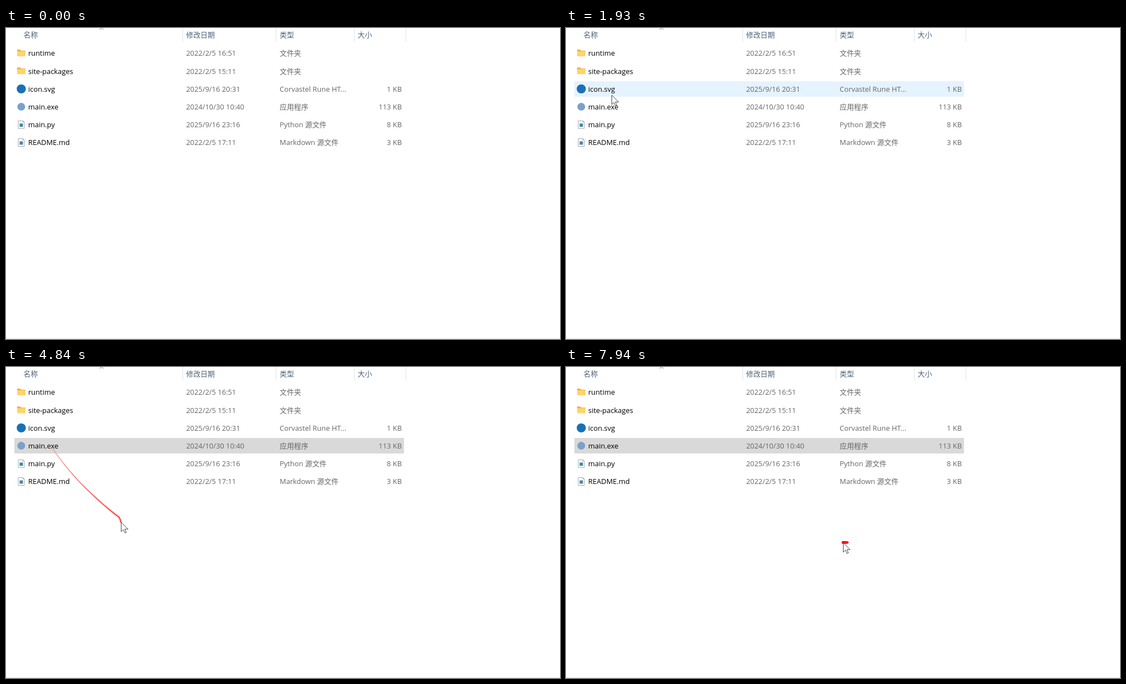
Animation, 998 px wide and 561 px high, one loop 8000 ms. Source, as an HTML page with a canvas:

```html
<!DOCTYPE html>
<html lang="zh-CN">
<head>
<meta charset="utf-8">
<title>文件列表</title>
<style>
html, body { margin: 0; width: 100%; height: 100%; overflow: hidden; background: #fff; }
svg, canvas { position: absolute; left: 0; top: 0; }
text { font: 12.9px "Open Sans", "Noto Sans CJK SC", "Noto Sans CJK", sans-serif; fill: #666; }
.name { fill: #000; }
.head { fill: #4c607a; }
.size { text-anchor: end; }
</style>
</head>
<body>
<svg id="list" width="998" height="561" viewBox="0 0 998 561"></svg>
<canvas id="overlay" width="998" height="561"></canvas>
<script>
const LOOP = 8000, LIFE = 500, LAG = 40;
const ENTER = 650, SELECT = 2690, PRESS = 70, LAUNCH = 3060, READY = 3910, GESTURE = 4390;
const clicks = [SELECT, 2930];
const selectedRow = 3;
const list = document.getElementById('list');
const ctx = document.getElementById('overlay').getContext('2d');

const files = [
  ['folder', 'runtime', '2022/2/5 16:51', '文件夹', ''],
  ['folder', 'site-packages', '2022/2/5 15:11', '文件夹', ''],
  ['web', 'icon.svg', '2025/9/16 20:31', 'Corvastel Rune HT...', '1 KB'],
  ['app', 'main.exe', '2024/10/30 10:40', '应用程序', '113 KB'],
  ['py', 'main.py', '2025/9/16 23:16', 'Python 源文件', '8 KB'],
  ['md', 'README.md', '2022/2/5 17:11', 'Markdown 源文件', '3 KB'],
];

// Icons are drawn around their own centre.
const sheet = mark => `<path d="M-5.5 -7H3L5.5 -4.5V7H-5.5Z" fill="#fff" stroke="#a3a8ad"/>
  <path d="M3 -7V-4.5H5.5" fill="none" stroke="#a3a8ad"/>
  <rect x="-3" y="-2" width="6" height="6" fill="${mark}"/>`;
const icons = {
  folder: `<path d="M-7.5 -6.5H-2L0 -4.5H7.5V0H-7.5Z" fill="#ecb23c"/>
    <rect x="-7.5" y="-3.5" width="15" height="9" rx="1" fill="#ffd56b"/>`,
  web: '<circle r="8.2" fill="#1a70b6"/>',
  app: '<circle r="7" fill="#7ba0cc"/>',
  py: sheet('#3f87a6'),
  md: sheet('#4c87a4'),
};

const text = (cls, x, y, s) => `<text class="${cls}" x="${x}" y="${y}">${s}</text>`;
const heads = [[31.5, '名称'], [324.5, '修改日期'], [493, '类型'], [633.5, '大小']];

list.innerHTML =
  [318.5, 486.5, 627.5, 720.5].map(x => `<path d="M${x} 0V25" stroke="#e5e5e5"/>`).join('') +
  '<path d="M168.5 3L172 -.5L175.5 3" fill="none" stroke="#777"/>' +
  '<path d="M0 560.5H998" stroke="#e5e5e5"/>' +
  heads.map(([x, s]) => text('head', x, 17, s)).join('') +
  files.map(([icon, name, date, type, size], i) => {
    const y = 50.3 + 32.2 * i;
    return `<rect class="row" x="15.5" y="${32.5 + 32 * i}" width="701" height="27"/>
      <g transform="translate(27.5 ${(y - 4.8).toFixed(1)})">${icons[icon]}</g>` +
      text('name', 40, y, name) + text('', 324.5, y, date) +
      text('', 493, y, type) + text('size', 713, y, size);
  }).join('');
const rows = list.querySelectorAll('.row');

// Pointer moves at even speed along each path and rests in between.
const moves = [
  [ENTER, 850, 'M800 520L128 245'],
  [1050, 1110, 'M128 245L110 233'],
  [1110, 1930, 'M110 233L82 121'],
  [1930, 2560, 'M82 121C-40 140 -10 190 84 147'],
  [GESTURE, 4600, 'M84 147Q112 188 145 220T205 272L207 280'],
  [5210, 5500, 'M207 280C150 200 330 180 342 230S300 290 241 257'],
  [6125, 6607, 'M241 257H487L315 290L425 314Q467 323 422 332V366'],
  [6640, 7220, 'M422 366Q530 350 512 305C480 220 217 190 217 270S460 400 507 316.5'],
  [7840, 7900, 'M507 316.5H499'],
].map(([start, end, d]) => {
  const path = document.createElementNS('http://www.w3.org/2000/svg', 'path');
  path.setAttribute('d', d);
  return { start, end, path, length: path.getTotalLength() };
});

function pointer(t) {
  const { start, end, path, length } = moves.findLast(m => t >= m.start) || moves[0];
  const u = Math.min(1, Math.max(0, (t - start) / (end - start)));
  return path.getPointAtLength(u * length);
}

function paintRows(t, { x, y }) {
  rows.forEach((row, i) => {
    const top = 32 + 32 * i;
    const hover = t >= ENTER && x >= 15 && x < 717 && y >= top && y < top + 28;
    const selected = i === selectedRow && t >= SELECT;
    const active = selected && hover && t < GESTURE;
    const fill = active ? '#cce8ff' : selected ? '#d9d9d9' : hover ? '#e5f3ff' : 'none';
    row.setAttribute('fill', fill);
    row.setAttribute('stroke', active ? '#99d1ff' : fill);
  });
}

function disc(x, y) {
  ctx.fillStyle = 'rgba(255,255,0,.5)';
  ctx.beginPath();
  ctx.arc(x, y, 12.5, 0, 2 * Math.PI);
  ctx.fill();
}

function ring(x, y, start, sweep, color) {
  ctx.strokeStyle = color;
  ctx.lineWidth = 3;
  ctx.beginPath();
  ctx.arc(x, y, 6.5, start, start + sweep);
  ctx.stroke();
}

// The trail thins and pales with age.
function trail(t) {
  ctx.lineCap = 'round';
  let from = Math.max(GESTURE, t - LIFE), a = pointer(from);
  while (from < t - LAG) {
    const to = Math.min(t - LAG, from + 6), b = pointer(to);
    if (a.x !== b.x || a.y !== b.y) {
      const fresh = 1 - (t - to) / LIFE;
      const pale = Math.round(165 * (1 - fresh));
      ctx.strokeStyle = `rgb(255,${pale},${pale})`;
      ctx.lineWidth = 1 + 4.5 * fresh ** 1.5;
      ctx.beginPath();
      ctx.moveTo(a.x, a.y);
      ctx.lineTo(b.x, b.y);
      ctx.stroke();
    }
    from = to;
    a = b;
  }
}

const arrow = new Path2D('M.5 .5V17L4.4 13.4L7.2 19.5L9.7 18.4L7 12.4H12.4Z');

function draw(t) {
  const p = pointer(t), { x, y } = p;
  paintRows(t, p);
  ctx.clearRect(0, 0, 998, 561);
  if (t < ENTER) return;
  if (clicks.some(c => t >= c && t < c + PRESS)) disc(x, y - 1);
  trail(t);
  if (t >= LAUNCH && t < READY) {
    ring(x + 14.5, y - 0.5, 0, 2 * Math.PI, '#9fd3f5');
    ring(x + 14.5, y - 0.5, t / 130, 1.6, '#1678c8');
  }
  ctx.save();
  ctx.translate(Math.round(x), Math.round(y));
  ctx.fillStyle = '#fff';
  ctx.fill(arrow);
  ctx.strokeStyle = '#444';
  ctx.lineWidth = 1;
  ctx.stroke(arrow);
  ctx.restore();
}

const began = performance.now();
function tick() {
  draw((performance.now() - began) % LOOP);
  requestAnimationFrame(tick);
}
tick();
</script>
</body>
</html>
```
